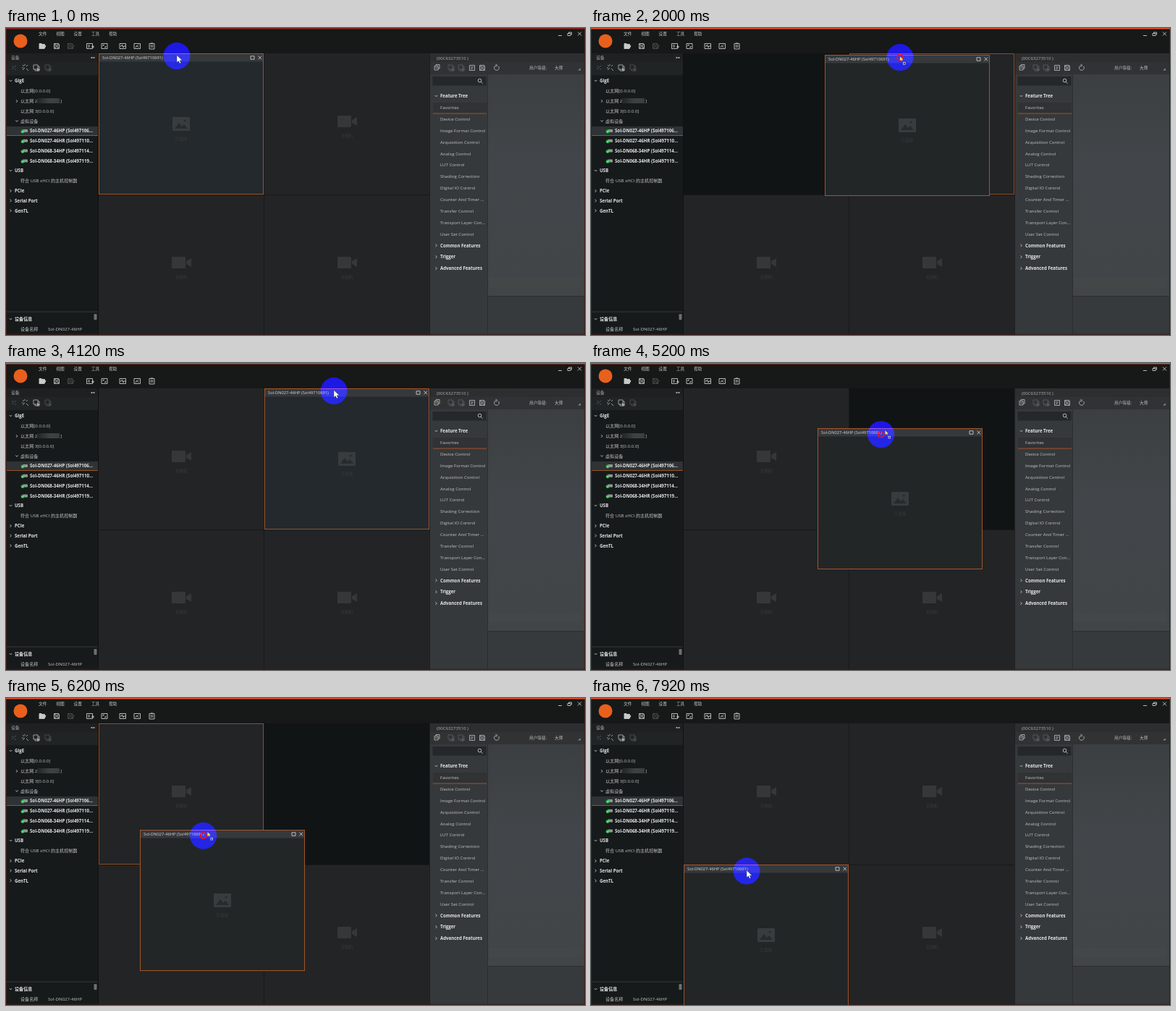
These frames come from a looping animation (800x424 px, 8000 ms). An HTML page:

```html
<!DOCTYPE html>
<html lang="zh-CN">
<head>
<meta charset="utf-8">
<title>Camera window drag</title>
<style>
html, body { margin: 0; width: 100%; height: 100%; overflow: hidden; background: #161818; }
svg { display: block; width: 800px; height: 424px; }
text { font: 6.1px "Open Sans", "Noto Sans CJK SC", "Noto Sans CJK", sans-serif; fill: #c2c4c4; }
.b { font-weight: 700; font-size: 6.1px; fill: #e4e6e6; }
.title { font-size: 5.75px; fill: #d4d6d6; }
.cjk { font-size: 5.7px; }
.soft { fill: #b0b2b2; }
.hint { font-size: 5.6px; fill: #393b3c; text-anchor: middle; }
.line { fill: none; stroke: #c8caca; stroke-width: .9; }
.dim { opacity: .3; }
.edge { fill: none; stroke: #a0552c; stroke-width: 1; }
#goal { stroke: #8c4c2a; }
#halo { fill: #1d16e4; mix-blend-mode: lighten; }
</style>
</head>
<body>
<svg viewBox="0 0 800 424">
  <defs>
    <linearGradient id="pane" x2="0" y2="1">
      <stop offset="0" stop-color="#3c3f41"/><stop offset=".4" stop-color="#42464a"/><stop offset="1" stop-color="#414548"/>
    </linearGradient>
    <linearGradient id="smudge">
      <stop offset="0" stop-color="#3c3f40" stop-opacity=".3"/><stop offset=".5" stop-color="#3c3f40"/><stop offset="1" stop-color="#5a5d5e" stop-opacity=".5"/>
    </linearGradient>
    <g id="camera" fill="#363738">
      <rect x="-13" y="-8" width="19" height="16" rx="1"/><path d="M7-2 14-6V6L7 2Z"/>
    </g>
    <g id="disk"><path class="line" d="M-3.5-3.5H2.5L3.5-2.5V3.5H-3.5ZM-2-3.5V-1H2V-3.5M-2 3.5V1H2V3.5"/></g>
    <g id="page"><path class="line" d="M-3.5-3.5H3.5V3.5H-3.5ZM-2-1H2M-2 1.2H1"/></g>
    <g id="pages"><path class="line" d="M-4-4H2V2H-4ZM-2 2V4H4V-2H2"/><path d="M1 0 5 2.5 1 5Z" fill="#c8caca"/></g>
  </defs>

  <!-- header -->
  <rect width="800" height="35" fill="#171818"/>
  <circle cx="20" cy="18" r="9.5" fill="#e8601c"/>
  <g id="menu"></g>
  <g id="tools">
    <path class="line" d="M46 28.5V21.5H49L50 22.5H53.5V24M46 28.5 48 24.5H55L53 28.5Z" style="fill:#c8caca"/>
    <use href="#disk" x="70" y="25"/>
    <g class="dim"><use href="#disk" x="89" y="25"/><path class="line" d="M90 29 95 24"/></g>
    <path class="line" d="M111.500 21.500H119.500V28.500H111.500ZM113 24H116M113 26H116M118 26H122M120 24V28"/>
    <path class="line" d="M132 21.500H140V28.500H132ZM134 25V23.500H136M138 25V26.500H136"/>
    <path class="line" d="M157 21.500H165.500V28.500H157ZM158 25H159.500L160.500 23 162 27 163 25H165"/>
    <path class="line" d="M177 21.500H185.500V28.500H177ZM179 27 181 24 183 27M183 23V24"/>
    <path class="line" d="M198 21.500H205V29H198ZM200 21H203M199.500 24H203.500M199.500 26H203.500"/>
    <path class="line" d="M763 10.500H768M776 7.500H780V10.500H776ZM777.500 7V6H781.500V9.500M790 5.500 795 10.500M795 5.500 790 10.500"/>
  </g>

  <!-- device panel -->
  <rect y="35" width="127" height="389" fill="#171a1b"/>
  <rect y="35" width="127" height="12" fill="#1e2021"/>
  <rect y="47" width="127" height="18" fill="#212425"/>
  <text class="cjk soft" x="7" y="43.200">设备</text>
  <path d="M117.500 41H122.500" stroke="#d0d2d2" stroke-width="1.600" stroke-dasharray="2 1"/>
  <path class="line dim" d="M8 57 14 52M8 54 10 52M12 58 14 56"/>
  <g opacity=".8">
    <path class="line" d="M23 58 26 55M28 53 30 51M23 51 25 53M28 56 31 59M26 50V52M22 55H24"/>
    <use href="#pages" x="42" y="55"/><use class="dim" href="#pages" x="58" y="55"/>
  </g>
  <rect x="1" y="136" width="126" height="12.500" fill="#2f3335"/>
  <rect x="1" y="148" width="126" height="1" fill="#9a4e26"/>
  <g id="tree"></g>
  <rect x="43" y="97" width="31" height="7" fill="url(#smudge)"/>
  <rect y="391.500" width="127" height="1" fill="#343839"/>
  <rect x="121.500" y="395" width="4" height="8" rx="1" fill="#6c7071"/>
  <rect x="127" y="35" width="1" height="389" fill="#0f1111"/>

  <!-- view grid -->
  <rect x="128" y="35" width="458" height="389" fill="#232425"/>
  <g id="cells"></g>
  <path d="M356.500 35V424M128 230.500H585" stroke="#181919"/>
  <rect id="gap" width="228" height="195" fill="#111415"/>
  <rect id="goal" class="edge" width="227" height="194"/>

  <!-- feature panel -->
  <rect x="585" y="35" width="215" height="389" fill="#36393b"/>
  <rect x="585" y="35" width="215" height="12" fill="#2c2e2f"/>
  <rect x="585" y="47" width="215" height="17" fill="#303234"/>
  <rect x="666" y="64" width="134" height="306" fill="url(#pane)"/>
  <rect x="667" y="345" width="128" height="13" fill="#444748"/>
  <rect x="666" y="371" width="134" height="53" fill="#373a3c"/>
  <path d="M665.500 64V424M666 370.500H800" stroke="#2b2d2f"/>
  <rect x="585" y="35" width="1" height="389" fill="#1d1f20"/>
  <text class="soft" x="595" y="43.500">(00C63273510 )</text>
  <g id="featureTools" opacity=".85">
    <path class="line" d="M592 52.500H597V58H592ZM594 52V50.500H599V56H597M593 55H596"/>
    <use class="dim" href="#pages" x="615" y="55"/><use class="dim" href="#pages" x="629" y="55"/>
    <use href="#page" x="644" y="55"/><use href="#disk" x="658" y="55"/>
    <path class="line" d="M680.500 52.800A3.400 3.400 0 1 1 677 51.700M676.500 50 679 51.700 676.500 53.500"/>
  </g>
  <text class="cjk soft" x="723" y="57.200">用户等级:</text>
  <text class="cjk" x="758" y="57.200">大师</text>
  <path d="M790 58.500H794L794 55.500Z" fill="#85888a"/>
  <rect x="589.500" y="67" width="74" height="12.500" fill="#25282a"/>
  <circle class="line" cx="654.500" cy="72.500" r="2.300"/><path class="line" d="M656 74.200 658.500 76.700"/>
  <rect x="590" y="103" width="74" height="15" fill="#303234"/>
  <rect x="590" y="117.500" width="74" height="1" fill="#a0522a"/>
  <g id="features"></g>

  <!-- frame of the application -->
  <path d="M.5 0V424M799.500 0V424M0 423H800" stroke="#3f1a17"/>
  <rect id="stripe" width="800" height="1.500"/>

  <!-- dragged window -->
  <g id="win">
    <rect id="body" width="228" height="195"/>
    <rect x="1" y="1" width="226" height="10.500" fill="#36393c"/>
    <text class="title" x="5" y="8.200">Sol-DN027-46HP (Sol49710691)</text>
    <path class="line" d="M210 3.800H215V8.200H210ZM220.500 3.500 225 8.300M225 3.500 220.500 8.300"/>
    <rect x="102" y="88" width="24" height="19" rx="1" fill="#393c3e"/>
    <path d="M105 104 111 96 115 101 118 98 123 104Z" fill="#282b2d"/>
    <circle cx="119" cy="93" r="1.500" fill="#282b2d"/>
    <text class="hint" x="114" y="120">已连接</text>
    <rect class="edge" x=".5" y=".5" width="227" height="194"/>
  </g>

  <circle id="halo" r="18.500"/>
  <circle id="ring" r="4" fill="none" stroke="#f01020" stroke-width="1.800"/>
  <path id="arrow" d="M0 0V10L2.400 7.800 4 11.300 5.700 10.500 4.200 7.200H7.500Z" fill="#fff" stroke="#222" stroke-width=".4"/>
  <g id="grab">
    <path d="M0-1V4.500L1.500 3.300 2.500 5 3.400 4.500 2.600 2.800H4.200Z" fill="#ffe45a"/>
    <rect x="4.500" y="7" width="2.600" height="2.600" fill="#222" stroke="#ddd" stroke-width=".8"/>
  </g>
</svg>
<script>
const $ = id => document.getElementById(id);
const NS = 'http://www.w3.org/2000/svg';

function add(parent, tag, attrs, content = '') {
  const node = document.createElementNS(NS, tag);
  for (const key in attrs) node.setAttribute(key, attrs[key]);
  node.textContent = content;
  return $(parent).appendChild(node);
}
const label = (parent, x, mid, content, cls = '') =>
  add(parent, 'text', { x, y: mid + 2.2, class: cls }, content);
const chevron = (parent, x, y, open) =>
  add(parent, 'path', { class: 'line', d: open ? `M${x - 1.7} ${y - 1}l1.7 1.8 1.7-1.8` : `M${x - 1} ${y - 1.8}l1.8 1.8-1.8 1.8` });

['文件', '视图', '设置', '工具', '帮助'].forEach((name, i) => label('menu', 45 + i * 24.3, 8, name, 'cjk'));

[['GigE', 73, true], ['USB', 197, true], ['PCIe', 225], ['Serial Port', 238.5], ['GenTL', 252.3], ['设备信息', 402, true]]
  .forEach(([name, y, open]) => { chevron('tree', 6.5, y, open); label('tree', 12, y, name, 'b'); });
[['以太网[0.0.0.0]', 87], ['以太网 2', 101], ['以太网 3[0.0.0.0]', 114.5], ['虚拟设备', 128.5],
 ['符合 USB xHCI 的主机控制器', 211], ['设备名称', 415.5]]
  .forEach(([name, y]) => label('tree', 20, y, name));
label('tree', 75, 101, ']');
label('tree', 58, 415.5, 'Sol-DN027-46HP');
chevron('tree', 15, 101);
chevron('tree', 15, 128.5, true);
['Sol-DN027-46HP (Sol497106...', 'Sol-DN027-46HR (Sol497110...', 'Sol-DN068-34HP (Sol497114...', 'Sol-DN068-34HR (Sol497119...']
  .forEach((name, i) => {
    const y = 142 + i * 13.8;
    label('tree', 33, y, name, 'b');
    add('tree', 'rect', { x: 23, y: y - 2, width: 7, height: 4, rx: 1, fill: '#8f9696' });
    add('tree', 'circle', { cx: 23, cy: y + 1, r: 2.4, fill: '#28b848' });
    add('tree', 'path', { d: `M21.800 ${y + 1}l1 1 1.600-2`, fill: 'none', stroke: '#fff', 'stroke-width': .7 });
  });

const rowY = i => 94 + i * 15.87;
['Favorites', 'Device Control', 'Image Format Control', 'Acquisition Control', 'Analog Control', 'LUT Control',
 'Shading Correction', 'Digital IO Control', 'Counter And Timer ...', 'Transfer Control', 'Transport Layer Con...', 'User Set Control']
  .forEach((name, i) => label('features', 600, rowY(i + 1), name));
[['Feature Tree', 0], ['Common Features', 13], ['Trigger', 14], ['Advanced Features', 15]]
  .forEach(([name, i]) => { chevron('features', 594.5, rowY(i), i === 0); label('features', 600, rowY(i), name, 'b'); });

const cells = [[128, 35], [357, 35], [128, 230], [357, 230]];
for (const [x, y] of cells) {
  add('cells', 'use', { href: '#camera', x: x + 114, y: y + 94 });
  add('cells', 'text', { class: 'hint', x: x + 114, y: y + 116 }, '无相机');
}

// pointer path: time, x, y
const path = [
  [0, 236, 38.6], [600, 236, 38.6], [800, 232, 39], [960, 232, 39], [1120, 260, 39], [1920, 427, 40.6], [2000, 427, 40.6],
  [2400, 453, 38.6], [4500, 453, 38.6], [4650, 450, 39], [4800, 452, 60], [5720, 334, 149], [6640, 216.5, 228],
  [6720, 216.5, 228], [7000, 215, 239], [8000, 215, 239]
];
// press, release, from cell, to cell, grip distance
const drags = [
  { down: 800, up: 2600, from: 0, to: 1, grip: 104 },
  { down: 4650, up: 7120, from: 1, to: 2, grip: 93 }
];
const LOOP = 8000, LAG = 45;

function pointAt(t) {
  let i = 1;
  while (i < path.length - 1 && path[i][0] < t) i++;
  const [t0, x0, y0] = path[i - 1], [t1, x1, y1] = path[i];
  const k = Math.max(0, Math.min(1, (t - t0) / (t1 - t0)));
  return [x0 + (x1 - x0) * k, y0 + (y1 - y0) * k];
}
const move = (id, [x, y]) => $(id).setAttribute('transform', `translate(${x} ${y})`);
const show = (id, on) => $(id).style.display = on ? '' : 'none';

function draw(now) {
  const raw = now % LOOP;
  // picture advances in alternating 120 ms and 80 ms steps
  const t = raw - raw % 200 + (raw % 200 >= 120 ? 120 : 0);
  const halo = pointAt(t), tip = pointAt(Math.max(0, t - LAG));
  const drag = drags.find(d => t >= d.down && t < d.up);
  let home = 0;
  for (const d of drags) if (t >= d.up) home = d.to;

  move('halo', halo);
  move('ring', halo);
  move('arrow', [tip[0], tip[1] - 1]);
  move('grab', tip);
  show('arrow', !drag);
  for (const id of ['grab', 'ring', 'gap']) show(id, drag);

  let goal = -1;
  if (drag) {
    move('win', [Math.round(tip[0] - drag.grip), Math.round(tip[1] - 4)]);
    move('gap', cells[drag.from]);
    goal = (tip[0] > 356 ? 1 : 0) + (tip[1] > 230 ? 2 : 0);
    if (goal === drag.from) goal = -1;
  } else {
    move('win', cells[home]);
  }
  show('goal', goal >= 0);
  if (goal >= 0) move('goal', cells[goal].map(v => v + .5));
  $('body').setAttribute('fill', drag || home === 2 ? '#232627' : '#24292d');
  $('stripe').setAttribute('fill', t < 120 ? '#8a2320' : '#e8502a');
}

const start = performance.now();
function tick() {
  draw(performance.now() - start);
  requestAnimationFrame(tick);
}
tick();
</script>
</body>
</html>
```
